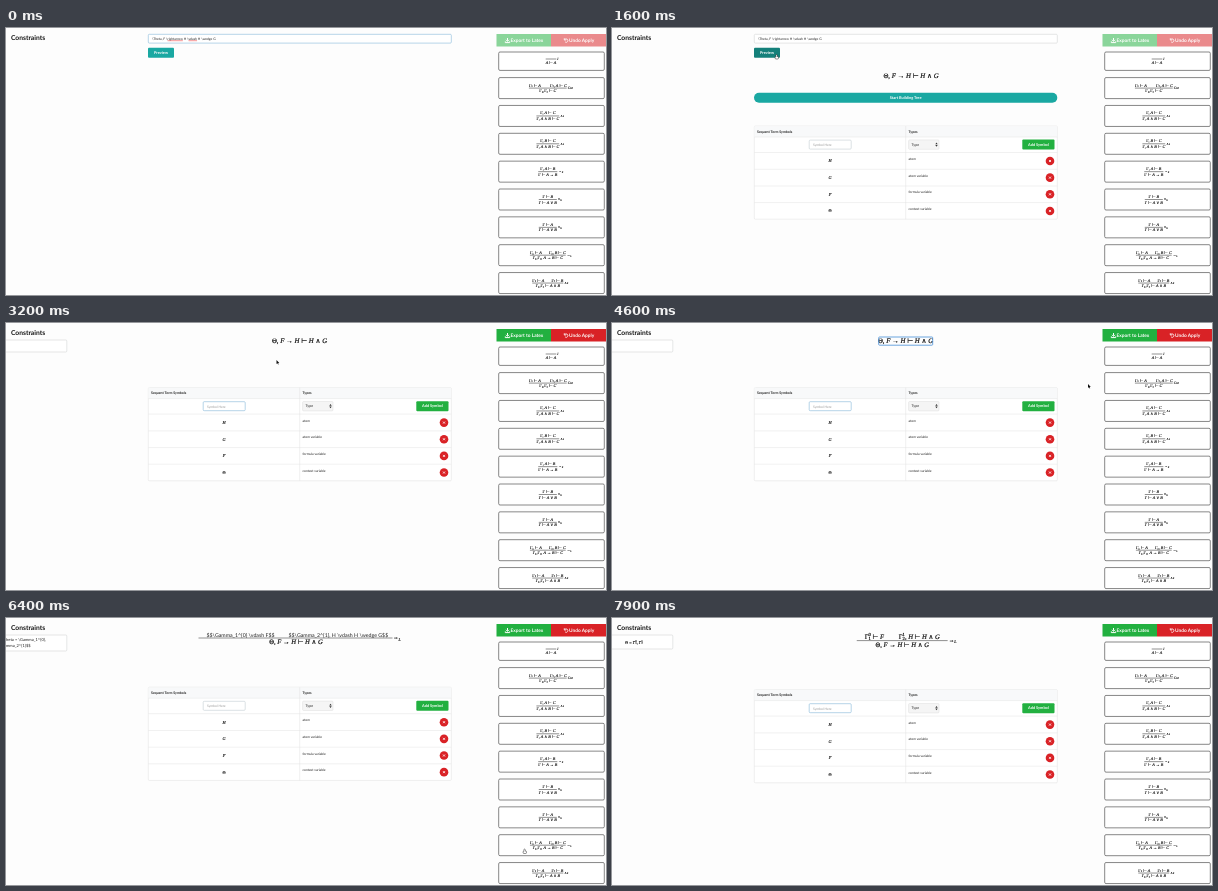
An HTML page with a canvas for the animation above (8000 ms loop, 600 by 267 pixels).

```html
<!DOCTYPE html>
<html lang="en">
<head>
<meta charset="utf-8">
<title>Sequent proof builder</title>
<style>
html, body { margin: 0; width: 100%; height: 100%; overflow: hidden; background: #fdfdfd; }
canvas { display: block; }
</style>
</head>
<body>
<canvas id="stage" width="600" height="267"></canvas>
<script>
const c = document.getElementById('stage').getContext('2d');
c.textRendering = 'geometricPrecision';

const SANS = 'Lato, sans-serif';
const SERIF = '"Liberation Serif", "DejaVu Sans", serif';
const TEAL = '#1aa8a2', TEAL_DARK = '#14807a', GREEN = '#22b040', RED = '#d92226';
const BLUE = '#85b7d9', GREY = '#d4d5d6';
const LOOP = 8000, STEP = 100;
const SEQUENT = 'Θ, F → H ⊢ H ∧ G';
const SOURCE = '\\Theta, F \\rightarrow H \\vdash H \\wedge G';

const RULES = [
  ['', 'A ⊢ A', 'I'],
  ['Γ_1 ⊢ A         Γ_2, A ⊢ C', 'Γ_1,Γ_2 ⊢ C', 'Cut'],
  ['Γ, A ⊢ C', 'Γ, A ∧ B ⊢ C', '∧_L'],
  ['Γ, B ⊢ C', 'Γ, A ∧ B ⊢ C', '∧_L'],
  ['Γ, A ⊢ B', 'Γ ⊢ A → B', '→_R'],
  ['Γ ⊢ B', 'Γ ⊢ A ∨ B', '∨_R'],
  ['Γ ⊢ A', 'Γ ⊢ A ∨ B', '∨_R'],
  ['Γ_1 ⊢ A       Γ_2, B ⊢ C', 'Γ_1,Γ_2, A → B ⊢ C', '→_L'],
  ['Γ_1 ⊢ A       Γ_2 ⊢ B', 'Γ_1,Γ_2 ⊢ A ∧ B', '∧_R'],
];
const SYMBOLS = [['H', 'atom'], ['G', 'atom variable'], ['F', 'formula variable'], ['Θ', 'context variable']];

const SCENES = [
  { at: 0, form: true },
  { at: 1300, form: true, table: 98, tree: 69.7, x: 299, y: 48 },
  { at: 1700, form: true, table: 87.2, tree: 59.3, x: 293.5, y: 42, focus: true },
  { at: 2900, table: 64.6, x: 293.5, y: 18, box: 12, focus: true },
  { at: 6200, table: 69.2, box: 16, raw: true },
  { at: 6800, table: 71.6, box: 14, proof: true, focus: true },
];

// time, tip x, tip y, hand pointer from here on
const POINTER = [
  [100, 330, 234, 0], [900, 166, 31, 0], [1000, 164.5, 26.5, 1], [1700, 164.5, 26.5, 0],
  [2100, 231, 60.5, 1], [2900, 231, 60.5, 0], [3200, 270.5, 37, 0], [3700, 284, 19, 0],
  [4000, 284, 19, 0], [4600, 476, 61, 0], [4900, 490, 90, 0], [5600, 518.5, 231, 1], [7000, 518.5, 231, 1],
];

function text(s, x, y, size, { color = '#222', weight = 400, align = 'left' } = {}) {
  c.font = `${weight} ${size}px ${SANS}`;
  c.textAlign = align;
  c.textBaseline = 'middle';
  c.fillStyle = color;
  c.fillText(s, x, y);
}

function box(x, y, w, h, r, fill, stroke, line = 0.6) {
  c.beginPath();
  c.roundRect(x, y, w, h, r);
  if (fill) { c.fillStyle = fill; c.fill(); }
  if (stroke) { c.strokeStyle = stroke; c.lineWidth = line; c.stroke(); }
}

function line(color, width, ...points) {
  c.beginPath();
  points.forEach(([x, y]) => c.lineTo(x, y));
  c.strokeStyle = color;
  c.lineWidth = width;
  c.stroke();
}

function button(s, x, y, w, h, color, r = 1, size = 3.9) {
  box(x, y, w, h, r, color);
  text(s, x + w / 2, y + h / 2, size, { color: '#fff', weight: 700, align: 'center' });
}

// Sets math from the left edge, with _ and ^ for scripts; returns the width.
function math(s, x, y, size, paint = true) {
  let pen = x, last = 0;
  c.textAlign = 'left';
  c.textBaseline = 'alphabetic';
  c.fillStyle = c.strokeStyle = '#111';
  for (let i = 0; i < s.length; i++) {
    let ch = s[i], scale = 1, shift = 0.32, back = 0;
    if (ch === '_' || ch === '^') {
      scale = 0.7;
      shift += ch === '_' ? 0.2 : -0.4;
      if (ch === '^' && s[i - 2] === '_') back = last;
      ch = s[++i];
    }
    c.font = `${/[A-Za-z]/.test(ch) ? 'italic ' : ''}${size * scale}px ${SERIF}`;
    last = c.measureText(ch).width;
    if (paint) {
      c.lineWidth = size * 0.03;
      c.fillText(ch, pen - back, y + shift * size);
      c.strokeText(ch, pen - back, y + shift * size);
    }
    pen += last - back;
  }
  return pen - x;
}

function mathCentered(s, x, y, size) {
  math(s, x - math(s, 0, 0, size, false) / 2, y, size);
}

function fraction([top, bottom, label], x, y, size, gap, pad = 0) {
  const w = Math.max(math(top, 0, 0, size, false), math(bottom, 0, 0, size, false)) + 2 * pad;
  mathCentered(top, x, y - gap, size);
  mathCentered(bottom, x, y + gap, size);
  line('#222', 0.5, [x - w / 2, y], [x + w / 2, y]);
  math(label, x + w / 2 + 1, y - 0.4, size * 0.85);
}

function drawActions(enabled) {
  c.globalAlpha = enabled ? 1 : 0.52;
  box(490.5, 6, 54.5, 12.6, 0, GREEN);
  box(545, 6, 55, 12.6, 0, RED);
  c.globalAlpha = 1;
  const white = { color: '#fff', weight: 700 };
  text('Export to Latex', 504.5, 12.6, 4.8, white);
  text('Undo Apply', 563, 12.6, 4.8, white);
  line('#fff', 1, [501.5, 10], [501.5, 12.8]);
  line('#fff', 0.8, [499.8, 11.8], [501.5, 13.4], [503.2, 11.8]);
  line('#fff', 1, [499.3, 13.4], [499.3, 14.6], [503.7, 14.6], [503.7, 13.4]);
  c.beginPath();
  c.arc(560.2, 12.6, 1.7, -2.6, 2.3);
  c.lineWidth = 0.8;
  c.stroke();
  line('#fff', 0.8, [558.3, 10.2], [558.3, 12], [560.1, 12]);
}

function drawRules() {
  RULES.forEach((rule, i) => {
    const y = i ? 60.1 + (i - 1) * 27.85 : 33.2;
    const h = i ? 21 : 18.4;
    box(492.7, y - h / 2, 105.6, h, 1.3, '#fff', '#555', 0.7);
    if (i) fraction(rule, 541.8, y, 4.1, 2.8);
    else fraction(rule, 545, y - 2.2, 4.1, 3.2);
  });
}

function drawForm(t) {
  const focused = t < 1300;
  box(142.3, 6.3, 303, 8.8, 1, '#fff', focused ? BLUE : GREY);
  text(SOURCE, 146, 10.9, 3.35);
  if (focused) {
    for (const word of ['rightarrow', 'vdash']) {
      const start = 146 + c.measureText(SOURCE.slice(0, SOURCE.indexOf(word))).width;
      line('#e33', 0.5, [start, 12.7], [start + c.measureText(word).width, 12.7]);
    }
  }
  button('Preview', 142, 19.7, 26, 10, t < 1000 ? TEAL : TEAL_DARK);
}

function drawTable(top, focus) {
  box(142.3, top, 303, 93.2, 1, '#fff', '#dcdddd', 0.5);
  box(142.5, top + 0.2, 302.6, 10.8, 0, '#f8f9fa');
  [11, 26.5, 43.3, 60, 76.6].forEach(y => line('#e2e2e3', 0.5, [142.3, top + y], [445.3, top + y]));
  line('#e2e2e3', 0.5, [293.7, top], [293.7, top + 93.2]);
  text('Sequent Term Symbols', 145, top + 5.6, 3.5, { weight: 700 });
  text('Types', 296.5, top + 5.6, 3.5, { weight: 700 });

  const y = top + 18.6;
  box(197.2, y - 4.5, 42, 9, 1, '#fff', focus ? BLUE : '#c3cdd2');
  text('Symbol Here', 201, y + 0.3, 3.3, { color: '#999' });
  box(296.6, y - 4.7, 30.4, 9.4, 1, '#f5f5f5', '#ddd', 0.5);
  text('Type', 299.5, y, 3.6);
  c.fillStyle = '#333';
  for (const dir of [-1, 1]) {
    c.beginPath();
    c.moveTo(323.3, y + dir * 0.4);
    c.lineTo(325.7, y + dir * 0.4);
    c.lineTo(324.5, y + dir * 2.1);
    c.fill();
  }
  button('Add Symbol', 410.3, y - 5, 32.2, 10, GREEN);

  SYMBOLS.forEach(([symbol, type], i) => {
    const row = top + 35 + i * 16.65;
    mathCentered(symbol, 218, row, 4.3);
    text(type, 296.5, row - 2, 3.3);
    box(433.7, row - 4.3, 8.6, 8.6, 4.3, RED);
    line('#fff', 0.8, [437, row - 1], [439, row + 1]);
    line('#fff', 0.8, [439, row - 1], [437, row + 1]);
  });
}

function drawConstraintBox(scene) {
  box(-2, 17, 62.8, scene.box, 1, '#fff', GREY);
  if (scene.raw) {
    text('heta = \\Gamma_1^{0},', 0, 22, 4.05);
    text('mma_2^{1}$$', 0, 27.5, 4.05);
  }
  if (scene.proof) math('Θ = Γ_1^0, Γ_2^1', 13, 24.2, 4.3);
}

function drawRawProof() {
  text('$$\\Gamma_1^{0} \\vdash F$$', 200.5, 17, 5.25);
  text('$$\\Gamma_2^{1}, H \\vdash H \\wedge G$$', 282.5, 17, 5.25);
  line('#222', 0.5, [192.5, 20], [386.5, 20]);
  mathCentered(SEQUENT, 290, 23.7, 6.6);
  math('→_L', 387, 19.6, 5.6);
}

function drawPointer(t) {
  const next = POINTER.findIndex(key => key[0] > t);
  if (next < 1) return;
  const [t0, x0, y0, hand] = POINTER[next - 1], [t1, x1, y1] = POINTER[next];
  const p = (t - t0) / (t1 - t0), e = p * p * (3 - 2 * p);
  c.save();
  c.translate(x0 + (x1 - x0) * e, y0 + (y1 - y0) * e);
  if (hand) {
    box(-0.5, 0, 1.1, 3, 0.5, '#fff', '#222', 0.5);
    box(-1.4, 2, 3.4, 2.5, 0.9, '#fff', '#222', 0.5);
    box(-0.25, 0.6, 0.6, 2.6, 0.3, '#fff');
  } else {
    c.beginPath();
    [[0, 0], [0, 4], [0.9, 3.2], [1.6, 4.6], [2.2, 4.3], [1.6, 3], [2.8, 2.9]].forEach(q => c.lineTo(...q));
    c.closePath();
    c.strokeStyle = '#fff';
    c.lineWidth = 0.6;
    c.stroke();
    c.fillStyle = '#111';
    c.fill();
  }
  c.restore();
}

function draw(t) {
  const scene = SCENES.findLast(s => s.at <= t);
  c.fillStyle = '#fdfdfd';
  c.fillRect(0, 0, 600, 267);
  text('Constraints', 5, 9.8, 6.7, { color: '#111', weight: 700 });
  drawActions(t >= 2900);
  drawRules();
  if (scene.form) drawForm(t);
  if (scene.box) drawConstraintBox(scene);
  if (scene.table) drawTable(scene.table, scene.focus);
  if (scene.tree) {
    button('Start Building Tree', 142, scene.tree - 5, 303.3, 10, t < 2100 ? TEAL : '#188e88', 5);
  }
  if (scene.y) mathCentered(SEQUENT, scene.x, scene.y, 6.8);
  if (scene.y && t >= 3700) box(266.7, 14, 54, 8.2, 0.8, null, '#5b9bdc', 0.9);
  if (scene.raw) drawRawProof();
  if (scene.proof) {
    fraction(['Γ_1^0 ⊢ F         Γ_2^1, H ⊢ H ∧ G', SEQUENT, '→_L'], 290.2, 22.6, 6.6, 4.2, 8);
  }
  drawPointer(t);
}

function tick(now) {
  draw(Math.floor(now % LOOP / STEP) * STEP);
  requestAnimationFrame(tick);
}
requestAnimationFrame(tick);
</script>
</body>
</html>
```
